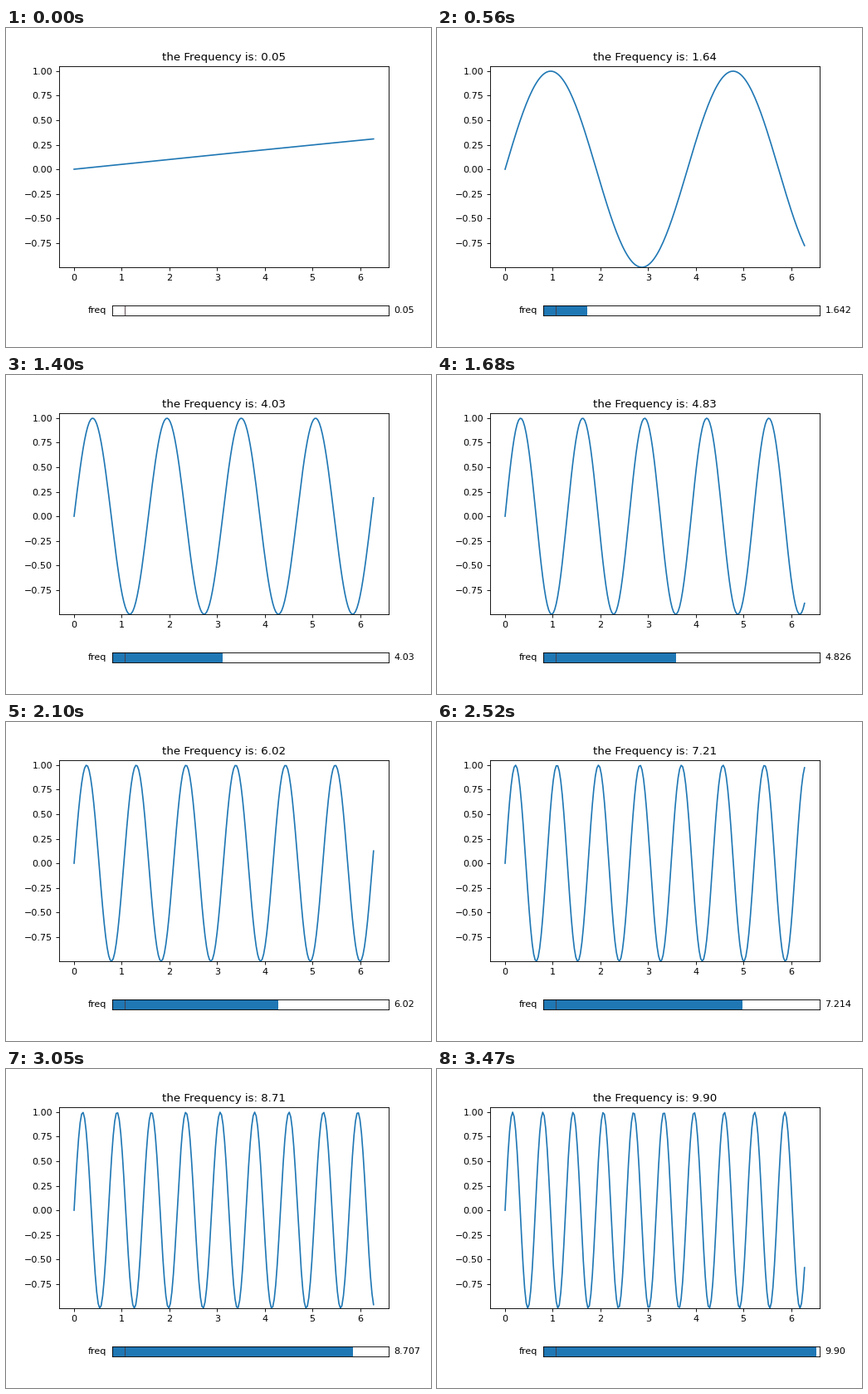
Animation, 512 px wide and 384 px high, one loop 3.51 s. Source, as a matplotlib script:

```python
import numpy as np
import matplotlib.pyplot as plt
from matplotlib.animation import FuncAnimation

LOOP_MS, TICK_MS = 3510, 10
STEPS = 100
LOW, HIGH, START = 0.05, 10, 0.5

freqs = np.linspace(LOW, HIGH, STEPS, endpoint=False)
x = np.linspace(0, 2 * np.pi, 200)

fig = plt.figure(figsize=(6.4, 4.8), dpi=80)

ax = fig.add_axes([0.125, 0.25, 0.775, 0.63])
curve, = ax.plot(x, np.sin(LOW * x), lw=1.5)
ax.set_ylim(-0.9997, 1.05)
title = ax.set_title("")

# Slider: a framed track with a bar, a start mark, a label and a value
track = fig.add_axes([0.25, 0.1, 0.65, 0.03])
bar = track.axvspan(LOW, LOW, 0, 1)
track.axvline(START, color="#4a3a40", lw=1, alpha=0.85)
track.set(xlim=(LOW, HIGH), ylim=(0, 1), yticks=[])
formatter = track.xaxis.get_major_formatter()
track.xaxis.set_visible(False)
track.text(-0.02, 0.5, "freq", transform=track.transAxes, ha="right", va="center")
value = track.text(1.02, 0.5, "", transform=track.transAxes, ha="left", va="center")


def step_at(ms):
    """Steps last 40 and 30 ms in turn."""
    pairs, rest = divmod(ms, 70)
    return min(2 * pairs + (rest >= 40), STEPS - 1)


def update(tick):
    freq = freqs[step_at(tick * TICK_MS)]
    curve.set_ydata(np.sin(freq * x))
    title.set_text(f"the Frequency is: {freq:.2f}")
    bar.set_width(freq - LOW)
    value.set_text(formatter.format_ticks([LOW, freq, HIGH])[1])
    return curve, title, bar, value


anim = FuncAnimation(fig, update, frames=LOOP_MS // TICK_MS, interval=TICK_MS,
                     repeat=True, repeat_delay=0, cache_frame_data=False)
plt.show()
```
